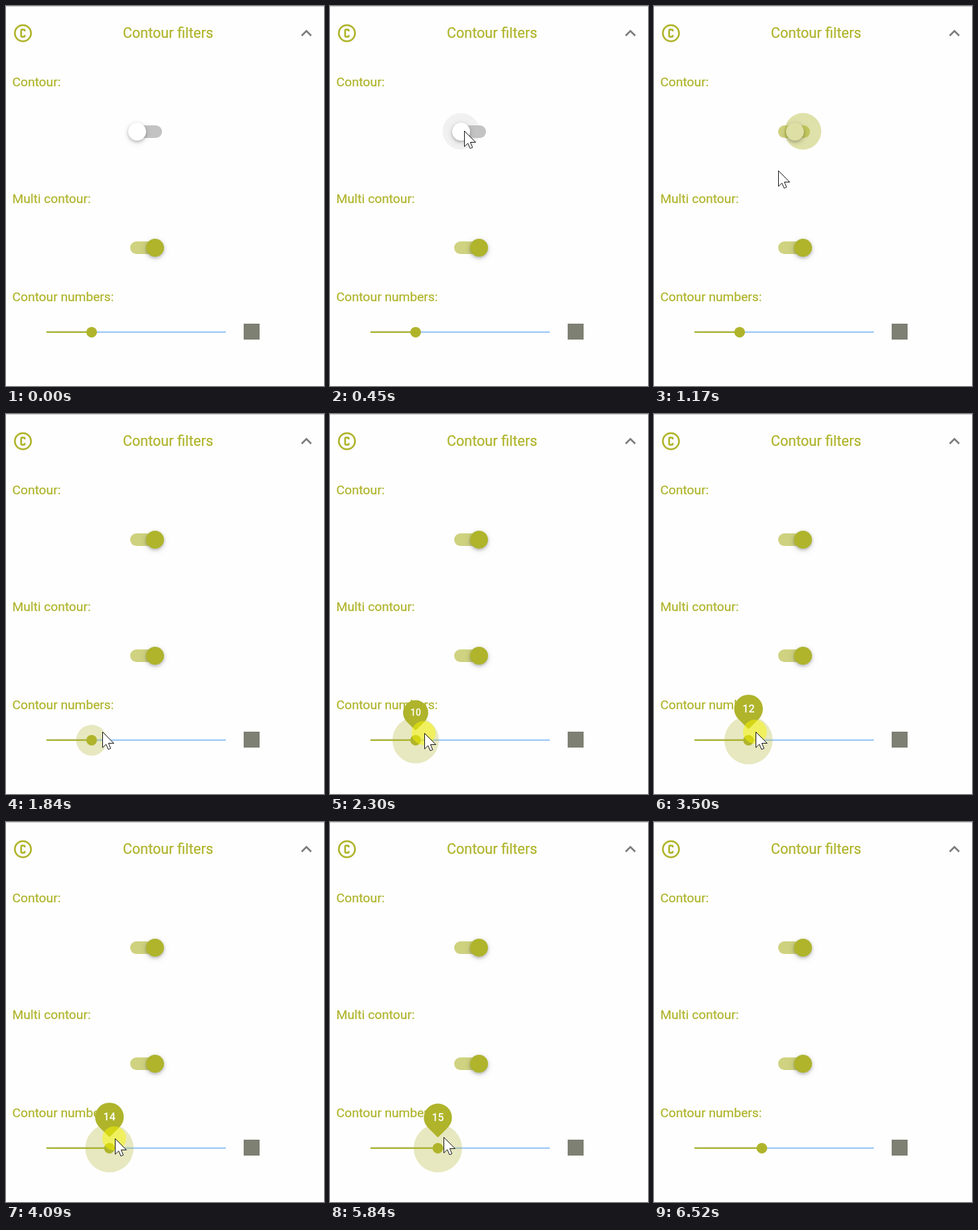
An HTML page for the animation above (6.89 s loop, 479 px wide and 573 px high).

```html
<!DOCTYPE html>
<html lang="en">
<head>
<meta charset="utf-8">
<title>Contour filters</title>
<style>
  html, body { margin: 0; width: 100%; height: 100%; overflow: hidden; background: #fefefe; }
  svg { display: block; width: 479px; height: 573px; }
  text { font-family: Roboto, sans-serif; font-size: 19.2px; fill: #afb42b; stroke: #afb42b; stroke-width: .25; }
  .title { font-size: 21.6px; }
  .pin-text { font-size: 16.2px; font-weight: 500; fill: #fff; stroke: none; text-anchor: middle; }
  .knob { filter: drop-shadow(0 2.5px 2px rgba(0, 0, 0, .2)) drop-shadow(0 2px 4px rgba(0, 0, 0, .15)); }
</style>
</head>
<body>
<svg viewBox="0 0 479 573">
  <rect width="479" height="1" fill="#c6c6c6"/>

  <g transform="translate(9.3 24.8) scale(1.35)" fill="none" stroke="#afb42b" stroke-width="2">
    <circle cx="12" cy="12" r="9"/>
    <path d="M14 10V9a1 1 0 0 0-1-1h-2a1 1 0 0 0-1 1v6a1 1 0 0 0 1 1h2a1 1 0 0 0 1-1v-1"/>
  </g>
  <text class="title" x="175.9" y="48">Contour filters</text>
  <path transform="translate(436.3 24.9) scale(1.35)" fill="#7b7b7b"
        d="M7.41 15.41L12 10.83l4.59 4.58L18 14l-6-6-6 6z"/>

  <text x="9.5" y="121">Contour:</text>
  <text x="9.5" y="297">Multi contour:</text>
  <text x="9.5" y="445">Contour numbers:</text>

  <circle id="switchRipple" cy="189" r="27.7"/>
  <rect id="switchTrack" x="187" y="180" width="48" height="19" rx="9.5"/>
  <circle id="switchKnob" class="knob" cy="189.5" r="13.5"/>

  <rect x="187" y="355" width="48" height="19" rx="9.5" fill="#cfd280"/>
  <circle class="knob" cx="224.5" cy="364.5" r="13.5" fill="#afb42b"/>

  <rect x="61" y="490.5" width="270" height="2.5" fill="#a3cbfa"/>
  <rect id="filled" x="61" y="490.6" height="2.3" fill="#afb42b"/>
  <rect x="358" y="479" width="24" height="24" fill="#7d8072"/>

  <g id="thumb" fill="#afb42b">
    <circle r="8"/>
    <circle id="thumbRipple" opacity=".3"/>
    <g id="pin">
      <path d="M0-16.6L-15.3-31.9A21.6 21.6 0 1 1 15.3-31.9Z"/>
      <text id="pinText" class="pin-text" y="-41.5"></text>
    </g>
  </g>

  <g id="cursor">
    <circle id="press" cx="-1" r="18" fill="#fafa00" opacity=".5"/>
    <path d="M.5.5V24l5.2-5 3.4 7.8 3.6-1.6-3.3-7.7h8z" fill="#fff" stroke="#111"/>
  </g>
</svg>
<script>
const LOOP = 6890;
const OLIVE = [175, 180, 43];
const PRESS = 910, SWITCH_ON = 1105;
const HOVER = 1640, GRAB = 2150, RELEASE = 5840, SHRINK = 5880, LEAVE = 6080;

// The pointer rests between moves.
const ENTRY = { x: 430, y: 560 };
const MOVES = [
  { from: 30, to: 440, x: 202, y: 188 },
  { from: 1080, to: 1600, x: 116, y: 533 },
  { from: 1620, to: 1840, x: 145, y: 479 },
  { from: 1900, to: 2200, x: 142, y: 481 },
  { from: 2960, to: 4090, x: 164, y: 477 },
  { from: 5310, to: 5540, x: 171, y: 475 },
  { from: 5890, to: 6510, x: 357, y: 576 }
];

const $ = id => document.getElementById(id);
const set = (id, attrs) => {
  for (const name in attrs) $(id).setAttribute(name, attrs[name]);
};
const mix = (a, b, k) => a + (b - a) * k;
const ramp = (t, start, length) => Math.min(1, Math.max(0, (t - start) / length));
const within = (t, a, b) => t >= a && t < b;

// cubic-bezier(.25, .8, .5, 1)
function ease(x) {
  const curve = (s, a, b) => 3 * s * (1 - s) ** 2 * a + 3 * s * s * (1 - s) * b + s ** 3;
  let low = 0, high = 1;
  for (let i = 0; i < 18; i++) {
    const mid = (low + high) / 2;
    if (curve(mid, .25, .5) < x) low = mid; else high = mid;
  }
  return curve(low, .8, 1);
}
const swing = (t, start) => ease(ramp(t, start, 300));

function pointerAt(t) {
  let { x, y } = ENTRY;
  for (const move of MOVES) {
    const k = ramp(t, move.from, move.to - move.from);
    x = mix(x, move.x, k);
    y = mix(y, move.y, k);
  }
  return { x: Math.round(x), y: Math.round(y) };
}

function drawSwitch(t) {
  const on = t >= SWITCH_ON;
  const k = swing(t, SWITCH_ON);
  const shade = OLIVE.map(c => Math.round(mix(255, c, k ** 1.4)));
  const opacity = on
    ? .4 * (1 - ramp(t, 1200, 300))
    : .05 * ramp(t, 360, 90) + .13 * ramp(t, PRESS, 150);
  set('switchRipple', { cx: on ? 224.3 : 197.3, fill: on ? '#afb42b' : '#000', opacity });
  set('switchTrack', { fill: on ? '#afb42b' : '#c3c3c3', opacity: on ? .6 : 1 });
  set('switchKnob', { cx: mix(197.5, 224.5, k), fill: `rgb(${shade})` });
}

function drawSlider(t, pointerX) {
  const value = t < GRAB ? 10 : t < RELEASE ? Math.round((pointerX - 71.5) / 6.75) : 15;
  const x = 62 + value * 6.7;
  const radius = 2.4 + 21.8 * (swing(t, HOVER) - swing(t, LEAVE))
    + 12.2 * (swing(t, GRAB) - swing(t, SHRINK));
  const scale = swing(t, GRAB) * (t < RELEASE ? 1 : .98) * (1 - swing(t, SHRINK));
  set('filled', { width: x - 61 });
  set('thumb', { transform: `translate(${x} 491.9)` });
  set('thumbRipple', { r: radius });
  set('pin', { transform: `scale(${scale})`, visibility: scale > .01 ? 'visible' : 'hidden' });
  $('pinText').textContent = value;
}

function draw(t) {
  const { x, y } = pointerAt(t);
  const pressed = within(t, PRESS, SWITCH_ON) || within(t, GRAB, RELEASE);
  drawSwitch(t);
  drawSlider(t, x);
  set('cursor', {
    transform: `translate(${x} ${y})`,
    visibility: within(t, 30, 6510) ? 'visible' : 'hidden'
  });
  set('press', { 'fill-opacity': pressed ? 1 : 0 });
}

const start = performance.now();
function tick() {
  draw((performance.now() - start) % LOOP);
  requestAnimationFrame(tick);
}
draw(0);
requestAnimationFrame(tick);
</script>
</body>
</html>
```
